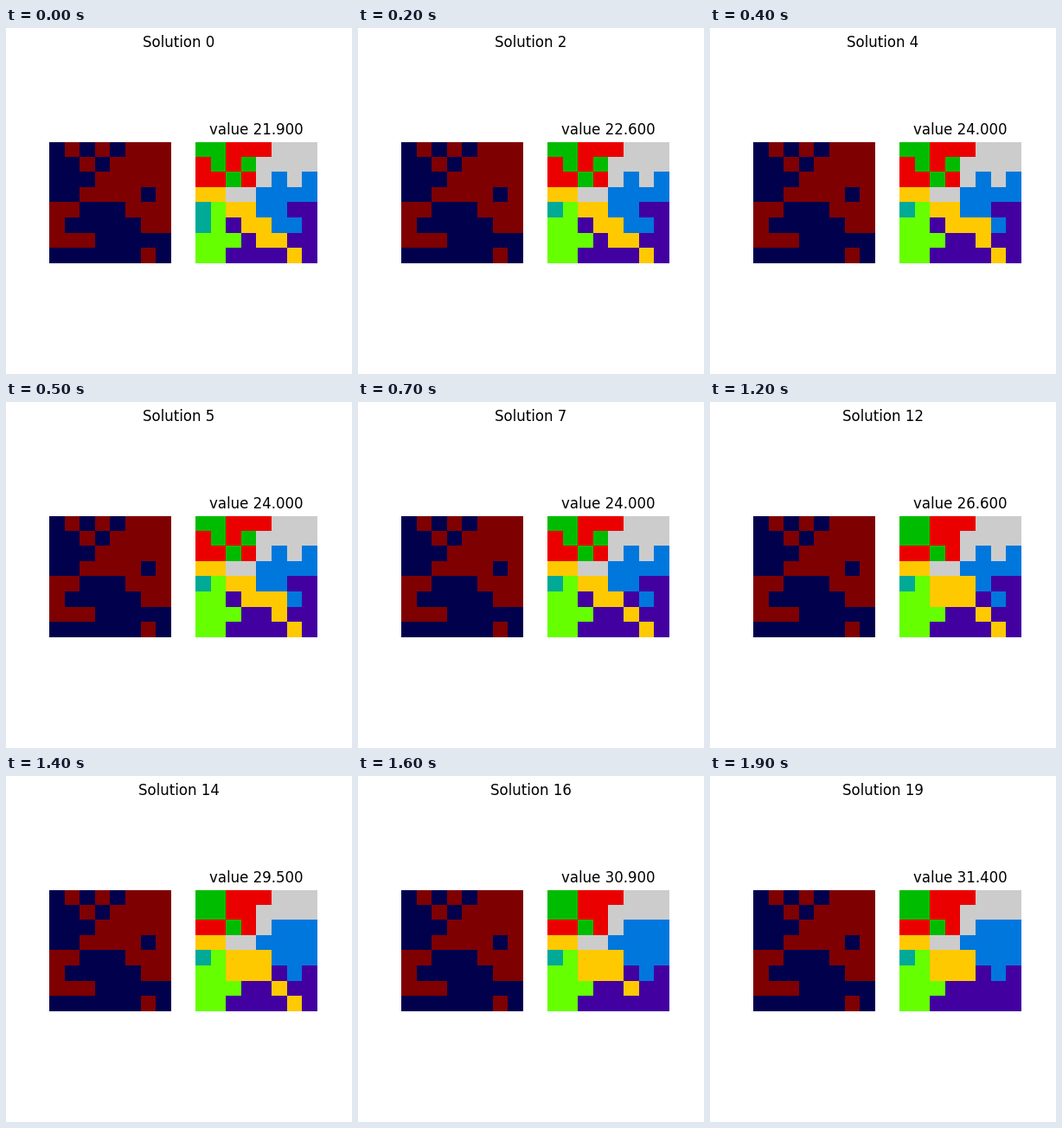
Write a matplotlib script that moves like this. It is 400 px wide and 400 px high and loops after 2000 ms.

```python
import numpy as np
import matplotlib.pyplot as plt
from matplotlib.animation import FuncAnimation

STEPS = 20
SIZE = 8
PURPLE, BLUE, TEAL, GREEN, LIME, YELLOW, RED, GRAY = range(1, 9)
at = np.s_


def paint(cells, colour, *areas):
    for area in areas:
        cells[area] = colour


def make_votes():
    votes = np.zeros((SIZE, SIZE), int)
    paint(votes, 1, at[:4, 5:], at[4, 5:], at[5, 6:], at[7, 6])
    paint(votes, 1, at[0, 1:4:2], at[1, 2:5:2], at[2, 3:], at[3, 2:])
    paint(votes, 1, at[4:7, 0], at[4, :2], at[6, :3])
    paint(votes, 0, at[3, 6])
    return votes


def make_plan():
    plan = np.full((SIZE, SIZE), PURPLE)
    paint(plan, GRAY, at[:4, 2:])
    paint(plan, RED, at[0, 2:5], at[1:3, :4])
    paint(plan, GREEN, at[0, :2], at[1, 1::2], at[2, 2])
    paint(plan, GRAY, at[1, 4:])
    paint(plan, BLUE, at[2, 5::2], at[3, 4:], at[4, 4:6], at[5, 5:7])
    paint(plan, LIME, at[4:, :2], at[6, 2])
    paint(plan, TEAL, at[4:6, 0])
    paint(plan, YELLOW, at[3, :2], at[7, 6])
    for row in range(4, 7):
        plan[row, row - 2:row] = YELLOW
    return plan


# areas changing hands, in order
CLAIMS = [
    (LIME, at[5, 0]),
    (YELLOW, at[5, 5]),
    (PURPLE, at[6, 4]),
    (PURPLE, at[5, 5]),
    ([GREEN, GREEN, RED, RED], at[1, :4]),
    (YELLOW, at[5, 2]),
    (YELLOW, at[4, 4]),
    (BLUE, at[4, 6:]),
    (BLUE, at[2, 6]),
    (PURPLE, at[7, 6]),
    (PURPLE, at[6, 5]),
]


def claims_made(step):
    return min(int(0.6 * step + 0.7), len(CLAIMS))


def districts(made):
    plan = make_plan()
    for colour, area in CLAIMS[:made]:
        paint(plan, colour, area)
    return plan


def value(made):
    score = np.interp(made, [0, 3, 4, 6, 7, 10, 11],
                      [21.9, 24, 24, 24.8, 26.6, 30.9, 31.4])
    return round(score, 1)


fig, (left, right) = plt.subplots(1, 2, figsize=(4, 4), dpi=100)
fig.subplots_adjust(left=0.125, right=0.9, bottom=0.11, top=0.88, wspace=0.2)
for ax in (left, right):
    ax.axis("off")

left.imshow(make_votes(), cmap="seismic", vmin=0, vmax=1,
            interpolation="nearest")
plan_image = right.imshow(make_plan(), cmap="nipy_spectral", vmin=0, vmax=GRAY,
                          interpolation="nearest")
heading = fig.suptitle("", fontsize=12)
caption = right.set_title("", fontsize=12)


def draw(step):
    made = claims_made(step)
    plan_image.set_data(districts(made))
    heading.set_text(f"Solution {step}")
    caption.set_text(f"value {value(made):.3f}")
    return plan_image, heading, caption


anim = FuncAnimation(fig, draw, frames=STEPS, interval=100,
                     init_func=lambda: draw(0), repeat=True, repeat_delay=0)
plt.show()
```
